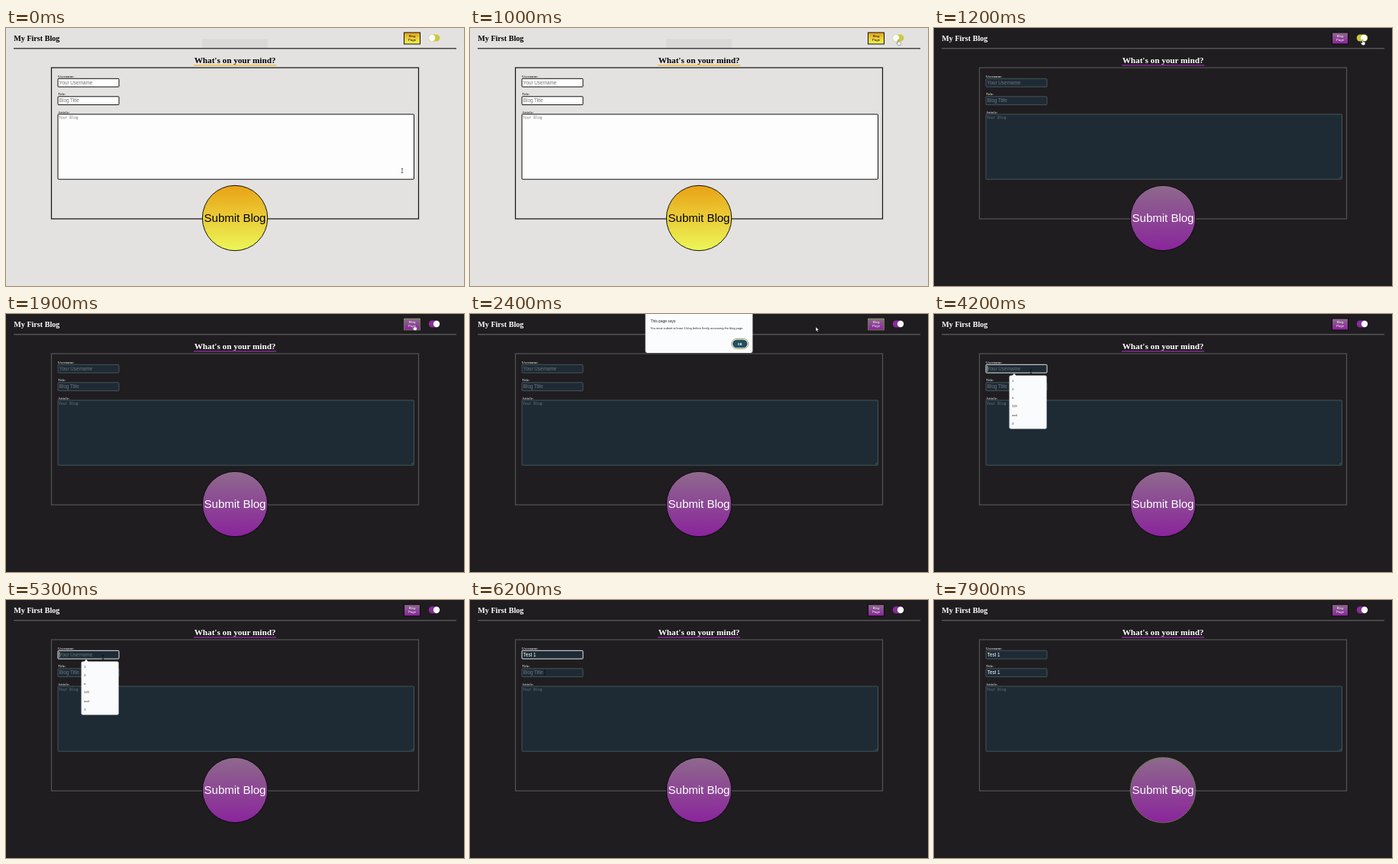
Recreate the animation shown at these times as an HTML page. Size 600x338 px, loop 8000 ms.

```html
<!DOCTYPE html>
<html lang="en">
<head>
<meta charset="utf-8">
<title>My First Blog</title>
<style>
html, body { margin: 0; width: 100%; height: 100%; overflow: hidden; }
svg {
  display: block; width: 100vw; height: 100vh;
  --bg: #e3e2e0; --ink: #000; --rule: #444; --frame: #111; --field: #fdfdfd; --edge: #111;
  --hint: #777; --top: #e9a216; --end: #ecf758; --line: #f0b429; --track: #cbc93c; --ring: #111;
}
svg.dark {
  --bg: #1f1d1f; --ink: #fff; --rule: #555; --frame: #555; --field: #1e2b35; --edge: #47525a;
  --hint: #6d757b; --top: #8e6a8c; --end: #8a249c; --line: #9a2fae; --ring: #0c080d;
}
svg.dark.switched { --track: #8a2a9c; }
text { font-family: "Liberation Sans", Arial, sans-serif; fill: var(--ink); white-space: pre; }
.serif { font-family: "Liberation Serif", Times, serif; }
.bold { font-weight: bold; }
.mid { text-anchor: middle; }
.label { font-size: 5px; }
.field { fill: var(--field); stroke: var(--edge); stroke-width: 1; }
.field.focus { stroke: #e4e6e8; }
.value { font-size: 6.3px; }
.hint { fill: var(--hint); }
.btn { fill: url(#paint); stroke: var(--ring); stroke-width: 1; }
.btn.hover { stroke: #78c832; stroke-dasharray: 1 1; }
.small { font-size: 4.35px; }
.dark-text { fill: #222; }
</style>
</head>
<body>
<svg id="stage" viewBox="0 0 600 338" preserveAspectRatio="none">
  <defs>
    <linearGradient id="paint" x1="0" y1="0" x2="0" y2="1">
      <stop offset="0" style="stop-color:var(--top)"/>
      <stop offset="1" style="stop-color:var(--end)"/>
    </linearGradient>
  </defs>
  <rect width="600" height="338" style="fill:var(--bg)"/>
  <rect id="ghost" x="257" y="14.5" width="86" height="12" fill="#dad9d7"/>

  <text class="serif bold" x="10.3" y="17" font-size="10.1">My First Blog</text>
  <path d="M10 26.7H590" stroke-width="1.5" style="stroke:var(--rule)"/>
  <rect id="page" class="btn" x="521.5" y="6" width="21" height="15"/>
  <text class="small mid" x="532" y="12.4">Blog</text>
  <text class="small mid" x="532" y="17.3">Page</text>
  <rect x="553.7" y="8.5" width="14.6" height="9" rx="4.5" style="fill:var(--track)"/>
  <circle id="knob" cy="13" r="4.2" fill="#fff"/>

  <text class="serif bold" x="246.7" y="45.6" font-size="11.16">What's on your mind?</text>
  <path d="M246 48.8H354" stroke-width="1.2" style="stroke:var(--line)"/>

  <rect x="59.5" y="52" width="481" height="198" fill="none" stroke-width="1.2" style="stroke:var(--frame)"/>
  <text class="serif label" x="68" y="64.6">Username:</text>
  <text class="serif label" x="68" y="88.1">Title:</text>
  <text class="serif label" x="68" y="111.6">Article:</text>
  <rect id="userBox" class="field" x="68" y="66.3" width="80" height="10.8" rx="1"/>
  <rect id="titleBox" class="field" x="68" y="89.8" width="80" height="10.8" rx="1"/>
  <rect class="field" x="68" y="113" width="466.5" height="85.2" rx="1"/>
  <path d="M531 197L533.5 194.5M532.5 197L533.5 196" stroke="#888" stroke-width=".4"/>
  <text id="user" class="value" x="69.8" y="74"/>
  <text id="title" class="value" x="69.8" y="97.4"/>
  <text class="hint" x="69" y="118.8" style="font-family:'Liberation Mono',monospace;font-size:4.75px">Your Blog</text>
  <rect id="caret" width=".7" height="7.4" fill="#fff"/>

  <circle id="submit" class="btn" cx="300" cy="249" r="42.7"/>
  <text class="mid" x="300" y="254.2" font-size="15">Submit Blog</text>

  <g id="list">
    <path d="M102.3 81L105 77.8L107.7 81Z" fill="#f9fbfc"/>
    <rect x="98.6" y="80.4" width="49" height="70.2" rx="2" fill="#f9fbfc"/>
  </g>

  <g id="dialog">
    <rect x="229.7" y="-4" width="140.6" height="55" rx="3" fill="#fbfcfd"/>
    <text class="dark-text" x="236.4" y="11" font-size="4.9">This page says</text>
    <text class="dark-text" x="236.2" y="20.2" font-size="3.95">You must submit at least 1 blog before freely accessing the blog page.</text>
    <rect x="342.7" y="32.5" width="22" height="13" rx="6.5" fill="#fff" stroke="#8d9a55" stroke-width=".9"/>
    <rect x="344" y="33.8" width="19.4" height="10.4" rx="5.2" fill="#24505e"/>
    <text class="bold mid" x="353.7" y="40.6" font-size="4" style="fill:#fff">OK</text>
  </g>

  <g id="cursor">
    <path id="arrow" d="M0 0V5.6L1.3 4.4L2.2 6.3L3.1 5.9L2.2 4.1H4Z" fill="#fff" stroke="#111" stroke-width=".35"/>
    <path id="beam" d="M-1.3 -2.7H1.3M0 -2.7V2.7M-1.3 2.7H1.3" fill="none" stroke="#333" stroke-width=".7"/>
    <path id="hand" d="M-.6 -.6Q0 -1.2 .6 -.6V2L3 2.6Q3.7 3 3.4 4L2.7 6.6H-.5L-2.6 3.4Q-2.2 2.5 -.6 3.8Z" fill="#fff" stroke="#111" stroke-width=".35"/>
  </g>
</svg>
<script>
const LOOP = 8000, STEP = 100;
const $ = id => document.getElementById(id);
const show = (id, on) => $(id).setAttribute("display", on ? "inline" : "none");
const within = (t, a, b) => t >= a && t < b;
const clamp = v => Math.max(0, Math.min(1, v));
const ease = v => v * v * (3 - 2 * v);

// time, x, y
const path = [
  [0, 519, 187], [400, 496, 130], [900, 561, 16], [1200, 561.5, 16],
  [1500, 561.5, 16], [1900, 535, 15], [2200, 535, 15], [2400, 453, 17],
  [2900, 354, 40], [3200, 354, 40], [3500, 229.5, 69], [3900, 127, 73],
  [4200, 127, 75], [5500, 127, 75], [6100, 98, 95], [7400, 98, 95], [7800, 318, 246]
];

const NS = "http://www.w3.org/2000/svg";
["1", "2", "a", "123", "asd", "3"].forEach((word, i) => {
  const item = document.createElementNS(NS, "text");
  item.setAttribute("x", 102.3);
  item.setAttribute("y", 88.8 + i * 11.2);
  item.setAttribute("font-size", 3.9);
  item.setAttribute("class", "dark-text");
  item.textContent = word;
  $("list").append(item);
});

function pointer(t) {
  const i = path.findIndex(p => p[0] > t);
  if (i < 0) return path[path.length - 1].slice(1);
  const [a, x, y] = path[i - 1], [b, u, v] = path[i];
  const k = ease((t - a) / (b - a));
  return [x + (u - x) * k, y + (v - y) * k];
}

function cursorKind(x, y, modal) {
  const over = (l, t, r, b) => x > l && x < r && y > t && y < b;
  if (modal) return "arrow";
  if (over(521, 6, 543, 21) || over(553, 8, 568, 18) || Math.hypot(x - 300, y - 249) < 43) return "hand";
  if (over(68, 66, 148, 77) || over(68, 89, 148, 101) || over(68, 113, 535, 198)) return "beam";
  return "arrow";
}

function fill(id, hint, typed) {
  const el = $(id);
  el.textContent = typed || hint;
  el.classList.toggle("hint", !typed);
  return typed ? el.getComputedTextLength() : 0;
}

const typing = (t, start, gap) =>
  "Test 1".slice(0, t < start ? 0 : Math.floor((t - start) / gap) + 1);

function draw(t) {
  const dark = t >= 1200;
  const modal = within(t, 2100, 3300);
  $("stage").classList.toggle("dark", dark);
  $("stage").classList.toggle("switched", t >= 1300);
  show("ghost", !dark);
  $("knob").setAttribute("cx", !dark ? 558.2 : t < 1300 ? 563.2 : 564);

  const [x, y] = pointer(t);
  const kind = cursorKind(x, y, modal);
  $("cursor").setAttribute("transform", `translate(${x} ${y})`);
  ["arrow", "beam", "hand"].forEach(k => show(k, k === kind));
  $("beam").setAttribute("stroke", dark ? "#0b0e11" : "#333");

  $("page").classList.toggle("hover", modal || (kind === "hand" && within(x, 521, 543)));
  $("submit").classList.toggle("hover", kind === "hand" && y > 200);

  const away = clamp((t - 3200) / 400);
  const shown = t < 2200 ? .6 : t < 3300 ? 1 : 1 - away;
  show("dialog", within(t, 2100, 3600));
  $("dialog").setAttribute("opacity", shown);
  $("dialog").setAttribute("transform", `translate(0 ${t < 3300 ? 0 : -5 * away})`);

  const onUser = within(t, 3900, 6600), onTitle = within(t, 6600, 7800);
  $("userBox").classList.toggle("focus", onUser);
  $("titleBox").classList.toggle("focus", onTitle);
  show("list", within(t, 4000, 5500));
  const userWidth = fill("user", "Your Username", typing(t, 5500, 50));
  const titleWidth = fill("title", "Blog Title", typing(t, 6800, 100));

  const blink = within(t, 5500, 6200) || (t < 5500 && Math.floor((t - 3800) / 500) % 2 !== 0) || within(t, 3900, 4300);
  show("caret", onUser ? blink : onTitle);
  $("caret").setAttribute("x", 69.6 + (onUser ? userWidth : titleWidth));
  $("caret").setAttribute("y", onUser ? 68 : 91.5);
}

function tick(now) {
  draw(Math.floor((now % LOOP) / STEP) * STEP);
  requestAnimationFrame(tick);
}
draw(0);
requestAnimationFrame(tick);
</script>
</body>
</html>
```
